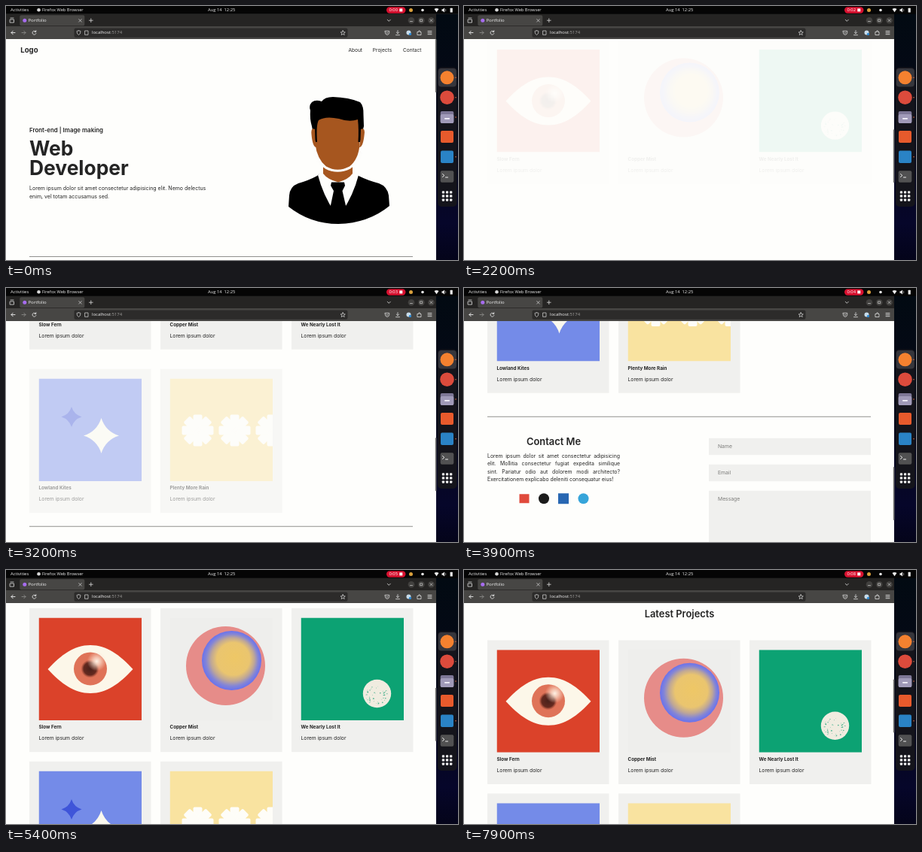
An HTML page with a canvas that plays this animation: 600 by 338 pixels, repeating every 8000 ms.

```html
<!DOCTYPE html>
<html lang="en">
<head>
<meta charset="utf-8">
<title>Portfolio</title>
<style>
html, body { margin: 0; width: 100%; height: 100%; overflow: hidden; background: #fefefc; }
canvas { display: block; width: 600px; height: 338px; }
</style>
</head>
<body>
<canvas id="stage"></canvas>
<script>
const canvas = document.getElementById('stage');
const ctx = canvas.getContext('2d');
const dpr = window.devicePixelRatio || 1;
canvas.width = 600 * dpr;
canvas.height = 338 * dpr;

const LOOP = 8000;
const PAPER = '#fefefc', PANEL = '#f0f0ee', INK = '#242424', CREAM = '#fcf7e9';
const PAGE = 'Inter, sans-serif', UI = '"Open Sans", sans-serif';
const TOP = 44, RIGHT = 571;
const ROW1 = 476, ROW2 = 680;

// [time, scroll offset]
const KEYS = [[0, 0], [750, 0], [1650, 330], [1950, 330], [2200, 453], [2800, 453],
  [3200, 585.5], [3900, 731.5], [4250, 830], [4930, 830], [5400, 426],
  [6050, 0], [6950, 0], [7900, 382.5], [8000, 382.5]];

const secant = i => (KEYS[i + 1][1] - KEYS[i][1]) / (KEYS[i + 1][0] - KEYS[i][0]);

function slope(i) {
  if (i === 0 || i === KEYS.length - 1) return 0;
  const a = secant(i - 1), b = secant(i);
  return a * b <= 0 ? 0 : 2 * a * b / (a + b);
}

// Monotone cubic through the keys
function scrollAt(t) {
  let i = 0;
  while (i < KEYS.length - 2 && t >= KEYS[i + 1][0]) i++;
  const [t0, a] = KEYS[i], [t1, b] = KEYS[i + 1];
  const d = t1 - t0, u = (t - t0) / d, v = 1 - u;
  return a * (1 + 2 * u) * v * v + b * u * u * (3 - 2 * u)
    + d * u * v * (v * slope(i) - u * slope(i + 1));
}

function fadeAt(t, start) {
  const u = Math.min(1, Math.max(0, (t - start) / 900));
  return u * u * (3 - 2 * u);
}

function rect(x, y, w, h, color, r = 0) {
  ctx.fillStyle = color;
  ctx.beginPath();
  ctx.roundRect(x, y, w, h, r);
  ctx.fill();
}

function disc(x, y, r, color) {
  ctx.fillStyle = color;
  ctx.beginPath();
  ctx.arc(x, y, r, 0, Math.PI * 2);
  ctx.fill();
}

function shape(d, color) {
  ctx.fillStyle = color;
  ctx.fill(new Path2D(d));
}

function line(d, color, width = 0.9) {
  ctx.strokeStyle = color;
  ctx.lineWidth = width;
  ctx.lineCap = ctx.lineJoin = 'round';
  ctx.stroke(new Path2D(d));
}

function text(str, x, y, size, color = INK, weight = 400, family = PAGE, align = 'left') {
  ctx.font = `${weight} ${size}px ${family}`;
  ctx.fillStyle = color;
  ctx.textAlign = align;
  ctx.textBaseline = 'middle';
  ctx.fillText(str, x, y);
}

function justified(str, x, y, width, size) {
  ctx.font = `400 ${size}px ${PAGE}`;
  const words = str.split(' ');
  const widths = words.map(w => ctx.measureText(w).width);
  const gap = (width - widths.reduce((a, b) => a + b)) / (words.length - 1);
  words.forEach((w, i) => {
    text(w, x, y, size);
    x += widths[i] + gap;
  });
}

function glow(x, y, r, stops, fx = x, fy = y) {
  const g = ctx.createRadialGradient(fx, fy, 0, x, y, r);
  stops.forEach(([p, c]) => g.addColorStop(p, c));
  disc(x, y, r, g);
}

function star(x, y, r, color) {
  const k = r * 0.24;
  ctx.fillStyle = color;
  ctx.beginPath();
  ctx.moveTo(x, y - r);
  for (let i = 0; i < 4; i++) {
    const a = i * Math.PI / 2, m = a - Math.PI / 4;
    ctx.quadraticCurveTo(x + k * Math.SQRT2 * Math.cos(m), y + k * Math.SQRT2 * Math.sin(m),
      x + r * Math.cos(a), y + r * Math.sin(a));
  }
  ctx.fill();
}

function flower(x, y) {
  disc(x, y, 15.5, '#fefdf8');
  for (let i = 0; i < 8; i++) {
    ctx.save();
    ctx.translate(x, y);
    ctx.rotate(i * Math.PI / 4);
    rect(-6, -21, 12, 19, '#fefdf8', 2);
    ctx.restore();
  }
}

function random(seed) {
  return () => (seed = seed * 16807 % 2147483647) / 2147483647;
}

// Each picture is drawn in its own 136.5 square
const ART = {
  eye() {
    rect(0, 0, 136.5, 136.5, '#db422a');
    shape('M12 68.5C30 49 47 36.5 68.5 36.5S107 49 125 68.5C107 88 90 100.5 68.5 100.5S30 88 12 68.5Z', CREAM);
    disc(68.5, 68, 22, '#df7358');
    glow(68, 68, 12, [[0, '#4a211b'], [0.7, '#64291f'], [1, 'rgba(130,55,40,0)']]);
    glow(77, 58, 13, [[0, 'rgba(255,248,236,.95)'], [0.4, 'rgba(255,236,220,.65)'], [1, 'rgba(255,225,205,0)']]);
  },
  moon() {
    rect(0, 0, 136.5, 136.5, '#eeeeec');
    disc(74, 64, 52.5, '#e68c89');
    glow(82, 57, 39.5, [[0, '#eec766'], [0.55, '#eac56f'], [0.73, '#bfa796'], [0.88, '#8284d8'], [1, '#6872ee']], 87, 52);
  },
  dot() {
    rect(0, 0, 136.5, 136.5, '#0ca273');
    disc(101, 101, 18.7, '#f0ece0');
    const rnd = random(71);
    for (let i = 0; i < 42; i++) {
      const a = rnd() * Math.PI * 2, r = 15 * Math.sqrt(rnd());
      disc(101 + r * Math.cos(a), 103 + r * 0.85 * Math.sin(a), 0.25 + rnd() * 0.65, '#3fae88');
    }
  },
  stars() {
    rect(0, 0, 136.5, 136.5, '#748be8');
    star(43.5, 51, 13.5, '#3f55d9');
    star(83, 76, 23.5, '#faf8ee');
  },
  flowers() {
    rect(0, 0, 136.5, 136.5, '#f9e3a0');
    [37, 86, 135].forEach(x => flower(x, 69));
  }
};

const CARDS = [
  ['eye', 'Slow Fern', 31, ROW1],
  ['moon', 'Copper Mist', 205, ROW1],
  ['dot', 'We Nearly Lost It', 379, ROW1],
  ['stars', 'Lowland Kites', 31, ROW2],
  ['flowers', 'Plenty More Rain', 205, ROW2]
];

function card([art, title, x, top], shown) {
  if (shown <= 0) return;
  const y = top + 24 * (1 - shown);
  rect(x, y, 161.5, 191.5, PANEL);
  ctx.save();
  ctx.translate(x + 12.5, y + 12.7);
  ctx.beginPath();
  ctx.rect(0, 0, 136.5, 136.5);
  ctx.clip();
  ART[art]();
  ctx.restore();
  text(title, x + 12.5, y + 158.5, 6.3, INK, 700);
  text('Lorem ipsum dolor', x + 12.5, y + 173.3, 6.8);
  if (shown < 1) {
    ctx.globalAlpha = 1 - shown;
    rect(x - 1, y - 1, 163.5, 193.5, PAPER);
    ctx.globalAlpha = 1;
  }
}

function portrait() {
  const skin = '#a6561f', white = '#fdfdfb';
  // suit, shirt, neck and tie
  shape('M420 219L413 226Q402 232 388 236Q377 240 376 252L375 267Q404 290 441 290Q481 289 509 266L508 252Q506 240 495 236Q480 232 468 226L461 219Z', '#000');
  shape('M420 217L414 225Q421 252 436 274L441 281L446 274Q461 252 468 225L461 217Z', white);
  shape('M421 212H460V223Q454 231 441 234.500Q427 231 421 223Z', skin);
  shape('M432 234.500H449L450 239L446.500 246L452 270L441 288L430 270L435 246L431 239Z', '#000');
  // head, hair, then ears over the hair
  line('M411 196Q414 207 425 214Q440 222 456 214Q467 207 470 196', white, 5.5);
  shape('M410 145H470L469.500 184Q468 204 456 213.500Q440 222 425 213.500Q413 204 410.500 184Z', skin);
  shape('M410.500 181Q408 172 406 160Q403 150 404 139Q401.500 133 406 128Q411 124 419 127Q423 121 434 121Q455 121.500 470 128Q475 133 474.500 145L475 160Q472 170 470.500 181L467.500 181Q468.500 164 467 151Q456 155 442 150Q424 146 415 152Q411.500 158 413 181Z', '#000');
  shape('M410 164Q404.500 161 405.500 171Q407 188 412 188L410.500 178ZM471 164Q477 161 475.700 171Q474 188 469 188L470.500 178Z', skin);
}

function hero(bold) {
  text('Logo', 19.3, 59.6, 9.6, INK, 700);
  text('About', 454.4, 59.3, 6.6);
  text('Projects', 486.8, 59.3, 6.6, INK, bold ? 700 : 400);
  text('Contact', 527, 59.3, 6.6);
  text('Front-end | Image making', 31, 166.1, 7.9, INK, 600);
  text('Web', 31, 191.3, 26.4, INK, 700);
  text('Developer', 31, 217.3, 26.4, INK, 700);
  text('Lorem ipsum dolor sit amet consectetur adipisicing elit. Nemo delectus', 31, 242.5, 7);
  text('enim, vel totam accusamus sed.', 31, 254, 7);
  portrait();
  rect(31, 333, 509, 0.9, '#90908e');
}

function contact() {
  rect(31, 902.6, 509, 0.9, '#90908e');
  text('Contact Me', 119, 937, 12.9, INK, 600, PAGE, 'center');
  ['Lorem ipsum dolor sit amet consectetur adipisicing',
    'elit. Mollitia consectetur fugiat expedita similique',
    'sint. Pariatur odio aut dolorem modi architecto?'
  ].forEach((s, i) => justified(s, 31, 955.3 + i * 10.5, 176, 6.9));
  text('Exercitationem explicabo deleniti consequatur eius!', 31, 986.8, 6.9);
  rect(73.5, 1006, 13, 12, '#e04a3c');
  disc(106, 1012, 7, '#1b1b1b');
  rect(125, 1005, 14, 14, '#2867b2');
  disc(158.5, 1012, 7, '#37a5da');
  [['Name', 931.5, 22.5], ['Email', 966.5, 22.5], ['Message', 1001.5, 105]].forEach(([s, y, h]) => {
    rect(325, y, 215, h, PANEL);
    text(s, 337, y + 11.3, 6.8, '#7b7b79');
  });
}

function page(t) {
  const s = scrollAt(t);
  rect(0, TOP, RIGHT, 338 - TOP, PAPER);
  ctx.save();
  ctx.beginPath();
  ctx.rect(0, TOP, RIGHT, 338 - TOP);
  ctx.clip();
  ctx.translate(0, -s);
  hero(t >= 6400);
  text('Latest Projects', 286, 441.8, 12.9, INK, 600, PAGE, 'center');
  const first = fadeAt(t, 2060), second = fadeAt(t, 2790);
  CARDS.forEach(c => card(c, c[3] === ROW1 ? first : second));
  contact();
  ctx.restore();
  rect(569.8, TOP + s / 3.77, 1.7, 71, '#747472', 0.8);
}

function topBar(t) {
  rect(0, 0, 600, 10.5, '#050505');
  text('Activities', 6, 5.3, 5.9, '#eee', 500, UI);
  disc(43.5, 5.3, 2.3, '#d8d8d8');
  text('Firefox Web Browser', 48, 5.3, 5.7, '#eee', 500, UI);
  text('Aug 14  12:25', 268, 5.3, 5.8, '#eee', 500, UI);
  rect(505, 1.3, 25.5, 8.4, '#d8102f', 4.2);
  text('0:0' + Math.floor((t + 200) / 1000), 508.5, 5.5, 5.8, '#fff', 500, UI);
  rect(522.3, 3.4, 4, 4, '#fff');
  disc(537.5, 5.5, 2.5, '#d9a03c');
  disc(553, 5.5, 1.8, '#eee');
  shape('M568.500 4Q571.500 1.800 574.500 4L571.500 8.300Z', '#eee');
  shape('M578.500 4.300H580L582 2.600V8.400L580 6.700H578.500Z', '#eee');
  line('M583.300 4Q584.300 5.500 583.300 7', '#eee', 0.6);
  rect(589.6, 2.8, 3.2, 5.8, '#eee', 0.5);
}

function browser() {
  rect(0, 10.5, RIGHT, 17, '#252423');
  rect(0, 27, RIGHT, TOP - 27, '#474644');
  line('M5.500 18H10.500V22H5.500ZM6 16H10', '#ddd', 0.8);
  rect(18.3, 12.3, 86, 14, '#474644', 2);
  disc(24.8, 19.2, 2.5, '#a76cf0');
  text('Portfolio', 29.5, 19.3, 6, '#f5f5f5', 400, UI);
  line('M96.700 17.500L100.300 21.100M100.300 17.500L96.700 21.100', '#ddd', 0.7);
  line('M112.800 16.800V21.600M110.400 19.200H115.200', '#ddd', 0.8);
  line('M506.300 18.200L508.300 20.300L510.300 18.200', '#ddd', 0.8);
  [538, 551.3, 564.5].forEach(x => disc(x, 19.2, 4.3, '#42413f'));
  line('M536.500 20.500H539.500M550 17.800H552.700V20.600H550ZM563 17.700L566 20.700M566 17.700L563 20.700', '#e8e8e8', 0.6);

  line('M12 35.500H7M9.200 33.200L7 35.500L9.200 37.800', '#eee', 0.9);
  line('M21 35.500H26M23.800 33.200L26 35.500L23.800 37.800', '#8a8987', 0.9);
  line('M39.600 34.200A2.500 2.500 0 1 0 39.900 36.500M39.800 32.600V34.500H38', '#eee', 0.8);
  rect(90.5, 29.4, 363, 12.4, '#2c2b2a', 2.2);
  line('M96.500 32.800Q98 32.800 99 33.500Q99 37.500 96.500 38.500Q94 37.500 94 33.500Q95 32.800 96.500 32.800', '#ddd', 0.7);
  line('M105 33H109V38.300H105Z', '#ddd', 0.7);
  text('localhost', 114, 35.7, 5.95, '#f5f5f5', 400, UI);
  const w = ctx.measureText('localhost').width;
  text(':5174', 114 + w, 35.7, 5.95, '#a3a2a0', 400, UI);
  line('M447.200 32.600L448.100 34.700L450.300 34.900L448.600 36.300L449.200 38.500L447.200 37.300L445.200 38.500L445.800 36.300L444.100 34.900L446.300 34.700Z', '#ddd', 0.7);
  line('M503.300 33.300H508.700V35.500Q508.500 38 506 38.400Q503.500 38 503.300 35.500ZM504.700 35L506 36.300L507.300 35', '#ddd', 0.8);
  line('M520 32.600V36.500M518.300 35L520 36.700L521.700 35M517.500 38.600H522.500', '#ddd', 0.8);
  disc(534.5, 35.6, 3, '#c8dcea');
  disc(536.5, 37.4, 1.6, '#2b8bd8');
  line('M546.300 34.500H547.800V33H549.500V34.500H551V38.500H546.300Z', '#ddd', 0.8);
  line('M560 33.500H565M560 35.600H565M560 37.700H565', '#eee', 0.8);
}

function dock() {
  const g = ctx.createLinearGradient(0, 10, 0, 338);
  g.addColorStop(0, '#020a12');
  g.addColorStop(0.5, '#060818');
  g.addColorStop(0.85, '#06062a');
  g.addColorStop(1, '#04041a');
  rect(RIGHT, 10.5, 600 - RIGHT, 327.5, g);
  rect(573, 81.5, 25.5, 185.5, '#14141b', 5);
  rect(573.8, 83, 24, 24.5, '#36363c', 4);
  disc(585.5, 95.3, 9, '#f5812f');
  disc(585.5, 121.7, 9.3, '#dc4b3c');
  rect(576.7, 140, 17.6, 16, '#7d7796', 2);
  rect(576.7, 144, 17.6, 12, '#a09ab8', 2);
  rect(582, 149, 7, 1.8, '#f4f2fa', 0.8);
  rect(577, 166, 17, 16, '#e75a2c', 2);
  rect(577, 192.5, 17, 16.5, '#2a83c6', 2);
  rect(576.7, 219.3, 17.6, 15.4, '#515152', 2);
  line('M579.500 223.500L581.800 225.500L579.500 227.500M583.500 228H586.500', '#fff', 0.9);
  for (let i = 0; i < 9; i++) {
    rect(578.8 + i % 3 * 5.1, 246.2 + Math.floor(i / 3) * 5.1, 3.3, 3.3, '#f0f0f0', 0.9);
  }
  [95.3, 121.7, 148, 200.7].forEach(y => disc(597, y, 0.8, '#d86a45'));
}

function draw(now) {
  const t = now % LOOP;
  ctx.setTransform(dpr, 0, 0, dpr, 0, 0);
  dock();
  page(t);
  browser();
  topBar(t);
}

const start = performance.now();
function tick() {
  draw(performance.now() - start);
  requestAnimationFrame(tick);
}
tick();
</script>
</body>
</html>
```
